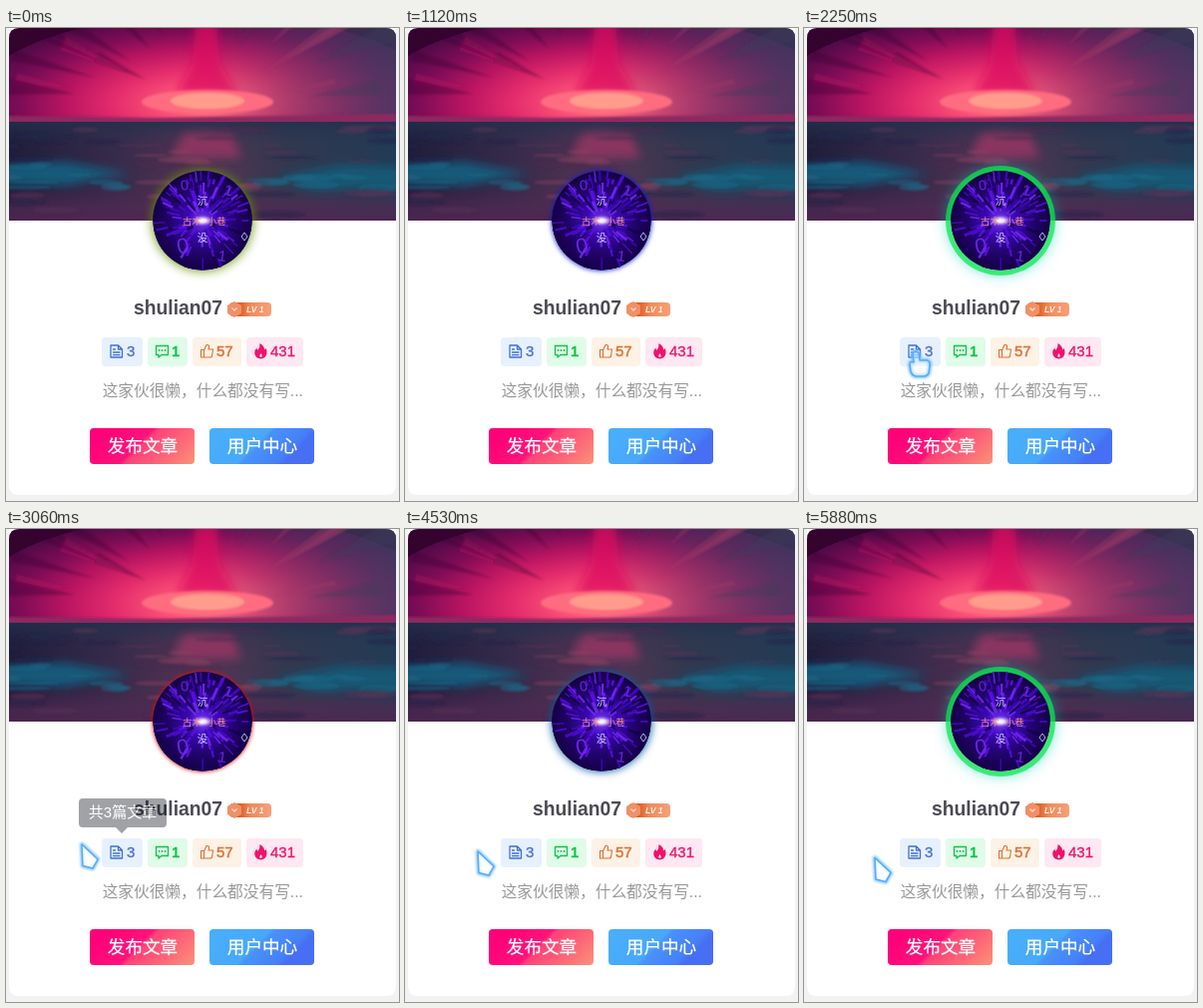
These frames come from a looping animation (394 by 474 pixels, 5.98 s). An HTML page:

```html
<!DOCTYPE html>
<html lang="zh-CN">
<head>
<meta charset="utf-8">
<title>Profile card</title>
<style>
html, body { margin: 0; width: 100%; height: 100%; overflow: hidden; background: #f2f2f3; }
#stage { position: relative; width: 394px; height: 474px; overflow: hidden; }
svg { position: absolute; left: 0; top: 0; }
text { font-family: "Liberation Sans", "Noto Sans CJK SC", "Noto Sans CJK", sans-serif; }
#glow { position: absolute; left: 147px; top: 143px; width: 100px; height: 100px; border-radius: 50%; }
.mid { text-anchor: middle; }
.icon { fill: none; stroke-width: 1.3; stroke-linejoin: round; stroke-linecap: round; }
.tiny text { font-family: "Noto Serif", "Noto Sans CJK SC", serif; }
</style>
</head>
<body>
<div id="stage">
<svg width="394" height="474">
  <defs>
    <clipPath id="cover"><path d="M3 193V10Q3 0 13 0H381Q391 0 391 10V193Z"/></clipPath>
    <clipPath id="above"><rect width="394" height="94"/></clipPath>
    <radialGradient id="sky" gradientUnits="userSpaceOnUse" cx="0" cy="0" r="1" gradientTransform="translate(202 76) scale(235 90)">
      <stop offset="0" stop-color="#ff7c84"/><stop offset=".2" stop-color="#fb5078"/>
      <stop offset=".4" stop-color="#e42c6c"/><stop offset=".6" stop-color="#bb1562"/>
      <stop offset=".8" stop-color="#7e0c56"/><stop offset="1" stop-color="#500a48"/>
      <stop offset="1.2" stop-color="#34042f"/>
    </radialGradient>
    <linearGradient id="dusk">
      <stop offset=".5" stop-color="#3c4a68" stop-opacity="0"/><stop offset=".75" stop-color="#3f4866" stop-opacity=".4"/>
      <stop offset="1" stop-color="#3c4a68" stop-opacity=".68"/>
    </linearGradient>
    <linearGradient id="sea">
      <stop offset="0" stop-color="#1b1936"/><stop offset=".3" stop-color="#3a2b4b"/>
      <stop offset=".5" stop-color="#593455"/><stop offset=".72" stop-color="#31394f"/>
      <stop offset="1" stop-color="#1f3d56"/>
    </linearGradient>
    <linearGradient id="shore" x2="0" y2="1">
      <stop offset="0" stop-color="#22304c" stop-opacity=".8"/><stop offset=".2" stop-color="#2a3350" stop-opacity=".2"/>
      <stop offset=".6" stop-color="#4c2a50" stop-opacity="0"/><stop offset=".85" stop-color="#4f2a52" stop-opacity=".75"/>
      <stop offset="1" stop-color="#502650" stop-opacity=".9"/>
    </linearGradient>
    <filter id="soft" x="-50%" y="-50%" width="200%" height="200%"><feGaussianBlur stdDeviation="5"/></filter>
    <filter id="haze" x="-50%" y="-80%" width="200%" height="260%"><feGaussianBlur stdDeviation="1.3"/></filter>
  </defs>
  <path d="M3 0H391V458Q391 468 381 468H13Q3 468 3 458Z" fill="#fff"/>
  <g clip-path="url(#cover)">
    <g clip-path="url(#above)">
      <rect width="394" height="94" fill="url(#sky)"/>
      <rect width="394" height="94" fill="url(#dusk)"/>
      <g id="beams" filter="url(#haze)"></g>
      <path d="M190-10H211L214 35L232 66H170L187 35Z" fill="#dc0f60" opacity=".75" filter="url(#soft)"/>
      <g filter="url(#haze)">
        <ellipse cx="202" cy="74" rx="66" ry="12" fill="#ff6c80"/>
        <ellipse cx="202" cy="73" rx="37" ry="8" fill="#ff9c8c"/>
        <path d="M0 88L150 90L394 86V95H0Z" fill="#8c2a60"/>
      </g>
    </g>
    <rect y="94" width="394" height="100" fill="url(#sea)"/>
    <rect y="94" width="394" height="100" fill="url(#shore)"/>
    <g filter="url(#soft)">
      <path d="M-10 138L60 134L125 146L60 158L-10 154Z" fill="#145a7a"/>
      <path d="M270 150L340 137L410 140V159L310 162Z" fill="#145875"/>
      <path d="M178 106H226L236 130H166Z" fill="#893660"/>
    </g>
    <g id="waves" filter="url(#haze)"></g>
  </g>
</svg>
<div id="glow"></div>
<svg width="394" height="474">
  <defs>
    <clipPath id="round"><circle cx="197" cy="193" r="50"/></clipPath>
    <radialGradient id="night">
      <stop offset="0" stop-color="#7a3cf0"/><stop offset=".3" stop-color="#3c08b4"/>
      <stop offset=".65" stop-color="#22046c"/><stop offset="1" stop-color="#150046"/>
    </radialGradient>
    <radialGradient id="spark">
      <stop offset="0" stop-color="#fff"/><stop offset=".35" stop-color="#e8d9ff"/>
      <stop offset="1" stop-color="#8050f0" stop-opacity="0"/>
    </radialGradient>
    <linearGradient id="warm" gradientUnits="userSpaceOnUse" x1="101" y1="384" x2="172" y2="454">
      <stop offset=".12" stop-color="#ff0078"/><stop offset=".46" stop-color="#ff147a"/>
      <stop offset=".5" stop-color="#ff4278"/><stop offset=".76" stop-color="#fd6977"/>
      <stop offset="1" stop-color="#fa9278"/>
    </linearGradient>
    <linearGradient id="cool" gradientUnits="userSpaceOnUse" x1="221" y1="384" x2="292" y2="454">
      <stop offset=".1" stop-color="#48aefa"/><stop offset=".44" stop-color="#48a8fa"/>
      <stop offset=".48" stop-color="#4792fa"/><stop offset=".72" stop-color="#4680f7"/>
      <stop offset=".78" stop-color="#466ff4"/>
    </linearGradient>
    <linearGradient id="pill"><stop offset=".25" stop-color="#dc5f28"/><stop offset=".5" stop-color="#f08a5a"/><stop offset="1" stop-color="#f8a078"/></linearGradient>
    <filter id="halo" x="-50%" y="-50%" width="200%" height="200%"><feGaussianBlur stdDeviation="1.2"/></filter>
  </defs>

  <g clip-path="url(#round)">
    <circle cx="197" cy="193" r="50" fill="url(#night)"/>
    <g id="rays"></g>
    <ellipse cx="197" cy="193" rx="12" ry="6" fill="url(#spark)"/>
    <g class="mid tiny" font-size="10.5" fill="#cdd5f4">
      <text x="197" y="177">沉</text><text x="197" y="214">没</text>
      <g font-size="9.5" fill="#f09084"><text x="186.500" y="196.500">古木</text><text x="211" y="196.500">小巷</text></g>
    </g>
    <path d="M239 205L242 209L239 213L236 209Z" fill="none" stroke="#b7b4ee"/>
  </g>

  <text x="128" y="287" font-size="19.3" font-weight="700" fill="#4a4a54">shulian07</text>
  <rect x="224" y="275" width="42" height="14" rx="4" fill="url(#pill)"/>
  <path d="M229 274L236 278V286L229 290L222 286V278Z" fill="#f09066"/>
  <path d="M226.500 280.500L229 283L231.500 280.500" fill="none" stroke="#ffd9c2" stroke-width="1.3"/>
  <text x="241" y="285" font-size="8.5" font-weight="700" font-style="italic" fill="#fff3ea">LV 1</text>

  <g id="chips"></g>
  <g class="icon">
    <path stroke="#3f70dc" d="M105 318H112.500L116.500 322V330H105ZM112.500 318V322H116.500M107.500 322H109.500M107.500 325H114M107.500 327.700H114"/>
    <path stroke="#0cc548" d="M150.500 318.500H162.500V327.500H156L153 330V327.500H150.500Z"/>
    <path stroke="#0cc548" stroke-width="1.8" d="M153.500 323H153.600M156.500 323H156.600M159.500 323H159.600"/>
    <path stroke="#dd7136" stroke-width="1.1" d="M195.500 322.500H198.500V330H195.500ZM198.500 323L201 317.500Q204 317 203.500 320L203 322H207.500L206.500 329L205.500 330H198.500"/>
  </g>
  <path fill="#f0116c" d="M254.500 316Q259.500 319 259 322.500Q260 322 260.200 320.500Q262 323 261.500 326Q260.500 331 255.500 331.500Q250 331 249.200 326Q249 322.500 251.500 320.500Q251.500 322 252.300 323Q255 320 254.500 316ZM255.500 326Q253.500 328 254.500 329.700H256.500Q257.500 328 255.500 326Z" fill-rule="evenodd"/>

  <text class="mid" x="197.300" y="369" font-size="15.7" fill="#999">这家伙很懒，什么都没有写...</text>
  <rect x="84" y="401" width="105" height="36" rx="4" fill="url(#warm)"/>
  <rect x="204" y="401" width="105" height="36" rx="4" fill="url(#cool)"/>
  <g class="mid" font-size="17.6" fill="#fff" stroke="#fff" stroke-width=".25">
    <text x="137" y="425">发布文章</text><text x="257" y="425">用户中心</text>
  </g>

  <g id="tip" opacity="0">
    <path d="M77 270H157Q161 270 161 274V295Q161 299 157 299H122L116 305L110 299H77Q73 299 73 295V274Q73 270 77 270Z" fill="#0c121c" fill-opacity=".63"/>
    <text class="mid" x="117" y="289" font-size="15" fill="#fff">共3篇文章</text>
  </g>
  <g id="cursor" stroke-linejoin="round">
    <g id="arrow"></g>
    <g id="hand"></g>
  </g>
</svg>
</div>
<script>
const LOOP = 5980, FIRST_PEAK = 400, HALF = 900;
const el = id => document.getElementById(id);

let seed = 7;
const rand = () => (seed = seed * 16807 % 2147483647) / 2147483647;
const between = (a, b) => a + (b - a) * rand();

// Point at angle a and distance d, as path text
const polar = (x, y, a, d) => `${(x + d * Math.cos(a)).toFixed(1)} ${(y + d * Math.sin(a)).toFixed(1)}`;

function drawRays() {
  let out = '';
  for (let i = 0; i < 150; i++) {
    const a = rand() * Math.PI * 2, r = between(8, 42), end = r + between(4, 15);
    const color = ['#5a10e0', '#3c08b4', '#7028f0', '#16004a', '#4c0ccc'][i % 5];
    out += `<path d="M${polar(197, 193, a, r)}L${polar(197, 193, a, end)}" stroke="${color}" stroke-width="${between(1, 3).toFixed(1)}" opacity=".9"/>`;
  }
  for (const [x, y, s, n] of [[173, 227, 22, 0], [176, 163, 14, 0], [218, 167, 15, 1], [212, 233, 15, 1]])
    out += `<text x="${x}" y="${y}" font-size="${s}" fill="#6a24e4" transform="rotate(${(x - 197) / 2} ${x} ${y})">${n}</text>`;
  el('rays').innerHTML = out;
}

// Faint wedges fanning out from the sun
function drawBeams() {
  let out = '';
  for (let i = 0; i < 34; i++) {
    const a = Math.PI * between(1.02, 1.98), r = between(60, 150), far = r + between(50, 130), w = between(.02, .07);
    const at = (angle, d) => polar(202, 80, angle, d);
    const color = Math.cos(a) > 0 ? ['#3d3c5c', '#a03a68'][i % 2] : ['#3a0535', '#b01260'][i % 2];
    out += `<path d="M${at(a, r)}L${at(a + w, far)}L${at(a - w, far)}Z" fill="${color}" opacity=".35"/>`;
  }
  el('beams').innerHTML = out;
}

function drawWaves() {
  let out = '';
  for (let i = 0; i < 60; i++) {
    const x = between(0, 394), y = between(99, 190), mid = Math.abs(x - 200) < 55;
    const teal = y > 134 && y < 160 && !mid;
    const color = teal ? '#1d6a88' : mid ? ['#86405f', '#4a2c50'][i % 2] : ['#573558', '#22264a'][i % 2];
    out += `<ellipse cx="${x}" cy="${y}" rx="${between(10, 30)}" ry="${between(1.2, 4)}" fill="${color}" opacity=".5"/>`;
  }
  el('waves').innerHTML = out;
}

function drawChips() {
  const chips = [
    [96, 41, '#e7f1fe', '#4a70d6', 121, '3', .35],
    [142, 40, '#e1fbe9', '#0cc548', 166, '1', .6],
    [187, 49, '#fdf2e5', '#dd7136', 211, '57', .5],
    [241, 57, '#fee8f2', '#f0116c', 265, '431', .35]
  ];
  el('chips').innerHTML = chips.map(([x, w, bg, ink, tx, label, bold]) =>
    `<rect x="${x}" y="310" width="${w}" height="29" rx="4" fill="${bg}"/>
     <text x="${tx}" y="329" font-size="15" fill="${ink}" stroke="${ink}" stroke-width="${bold}">${label}</text>`).join('');
}

function drawPointer(id, d, fill) {
  el(id).innerHTML =
    `<path d="${d}" fill="none" stroke="#79bdfb" stroke-width="4.5" opacity=".8" filter="url(#halo)"/>
     <path d="${d}" fill="#fff" fill-opacity="${fill}" stroke="#55adf7" stroke-width="1.6"/>`;
}

// Piecewise linear lookup in rows of [time, ...values]
function track(rows, t) {
  const i = rows.findIndex(r => r[0] > t);
  if (i === 0) return rows[0].slice(1);
  if (i < 0) return rows[rows.length - 1].slice(1);
  const a = rows[i - 1], b = rows[i], u = (t - a[0]) / (b[0] - a[0]);
  return a.slice(1).map((v, k) => v + (b[k + 1] - v) * u);
}

const path = [
  [2010, 84, 323], [2130, 112, 323], [2650, 112, 323], [2880, 74, 318], [3060, 76, 316],
  [3200, 70, 318], [3380, 116, 319], [3680, 124, 320], [3920, 122, 321], [4200, 76, 321],
  [4530, 73, 323], [4820, 73, 330], [5150, 66, 331], [5550, 71, 329.5]
];
const tipFade = [
  [2300, 0], [2450, 1], [2960, 1], [3060, .62], [3180, .2], [3340, .2], [3480, 1], [4120, 1], [4300, 0]
];
const stops = [
  { rgb: [0, 255, 0], blur: 16 }, { rgb: [0, 0, 255], blur: 4 },
  { rgb: [0, 255, 0], blur: 16 }, { rgb: [255, 0, 0], blur: 4 }
];

function glowAt(t) {
  const phase = (t - FIRST_PEAK) / HALF + 4, k = Math.floor(phase), u = phase - k;
  const e = u * u * (3 - 2 * u);
  const a = stops[k % 4], b = stops[(k + 1) % 4];
  const mix = (p, q) => p + (q - p) * e;
  const green = k % 2 ? e : 1 - e;
  const ring = Math.min(1, Math.max(0, (green - .8) / .1));
  const rgb = a.rgb.map((v, i) => Math.round(mix(v, b.rgb[i])));
  rgb[1] -= Math.round(50 * ring);
  rgb[2] = Math.round(Math.max(rgb[2], 190 * ring));
  return `0 0 0 ${5 * ring}px rgba(10,235,70,${.72 * ring}), ` +
    `0 0 ${mix(a.blur, b.blur)}px ${2 * ring}px rgba(${rgb},${1 - .3 * ring})`;
}

function frame() {
  const t = performance.now() % LOOP;
  el('glow').style.boxShadow = glowAt(t);
  el('tip').setAttribute('opacity', track(tipFade, t)[0]);
  const [x, y] = track(path, t), onChip = x > 97;
  el('cursor').setAttribute('transform', `translate(${x} ${y})`);
  el('cursor').style.display = t < path[0][0] ? 'none' : '';
  el('hand').style.display = onChip ? '' : 'none';
  el('arrow').style.display = onChip ? 'none' : '';
  requestAnimationFrame(frame);
}

drawRays();
drawBeams();
drawWaves();
drawChips();
drawPointer('arrow', 'M0 0L16 15L11 24L1 21.500Z', .8);
drawPointer('hand', 'M-3 3Q0-1 3 3L4 10L11 10Q15 11 14 16L13 23Q11 26 8 26H0Q-4 25-5 21L-6 15Q-6 10-2 12Z', .35);
frame();
</script>
</body>
</html>
```
